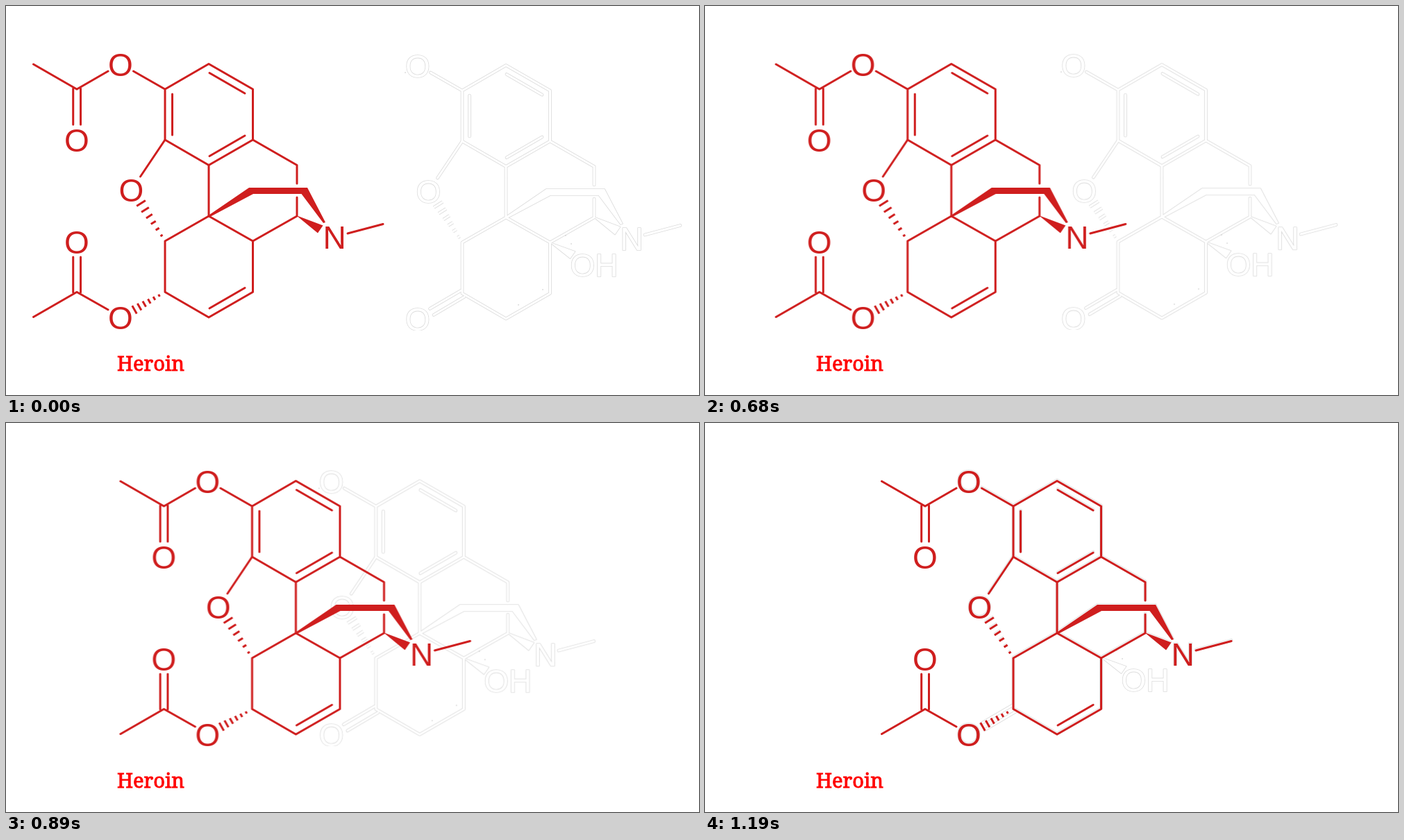
An HTML page for the animation above (7190 ms loop, 998 by 561 pixels).

```html
<!DOCTYPE html>
<html lang="en">
<head>
<meta charset="utf-8">
<title>Heroin</title>
<style>
html, body { margin: 0; width: 100%; height: 100%; overflow: hidden; background: #fff; }
svg { display: block; width: 998px; height: 561px; }
.bond { fill: none; stroke: currentColor; stroke-width: 3; stroke-linejoin: round; stroke-linecap: round; }
.hash { fill: none; stroke: currentColor; stroke-width: 3; }
.wedge { fill: currentColor; }
.atom { fill: currentColor; font: 46px "Liberation Sans", Arial, sans-serif; }
.red { color: #cf1e1e; }
.edge { color: #dcdcdc; }
.edge .bond, .edge .hash { stroke-width: 4.7; }
.edge .wedge, .edge .atom { stroke: currentColor; stroke-width: 1.7; stroke-linejoin: round; }
.core { color: #fff; }
.specks { fill: #c4c4c4; }
.name { fill: #f00; stroke: #f00; stroke-width: .9; font: 29px "Noto Serif", serif; }
</style>
</head>
<body>
<svg viewBox="0 0 998 561">
  <clipPath id="crop"><rect x="140" y="67" width="410" height="399"/></clipPath>
  <g id="right"></g>
  <g id="left"></g>
  <text class="name" x="160" y="526">Heroin</text>
</svg>
<script>
const bond = d => `<path class="bond" d="${d}"/>`;
const wedge = points => `<polygon class="wedge" points="${points}"/>`;
const atom = (s, x, y) =>
  `<text class="atom" text-anchor="middle" x="${x}" y="${y + 16.5}">${s}</text>`;

// Row of cross strokes that narrows from (x1, y1) to (x2, y2)
function hash(x1, y1, x2, y2, wide, n = 6) {
  const len = Math.hypot(x2 - x1, y2 - y1);
  const nx = (y1 - y2) / len, ny = (x2 - x1) / len;
  let d = '';
  for (let i = 0; i < n; i++) {
    const f = i / (n - 1), h = wide + (1.8 - wide) * f;
    const x = x1 + (x2 - x1) * f, y = y1 + (y2 - y1) * f;
    d += `M${x - nx * h} ${y - ny * h}L${x + nx * h} ${y + ny * h}`;
  }
  return `<path class="hash" d="${d}"/>`;
}

const shared =
  bond('M183.5 94L229 120L292 83.5L355.5 120V193L292 229.5L229 193V120') +
  bond('M239.5 127V186M293 96.5L344 126M344 187L293 216.5') +
  bond('M355.5 193L419 229.5V256M419 276V303L355.5 339') +
  bond('M229 193L193.5 246M292 229.5V303') +
  bond('M292 303L229 339V412.5L292 449L355.5 412.5V339Z') +
  bond('M492 328L543 314.5') +
  hash(194.5, 284.5, 224, 331, 7.5) +
  wedge('291.5,302 350,262 434,262 460,312 457,313 425.5,271 356,271 293,304.5') +
  wedge('418,302 456.5,316.5 449,327.5') +
  atom('O', 165, 84) + atom('O', 180.5, 265) + atom('N', 473, 333);

const acetyls =
  bond('M39.5 84L102 120L147 94M96.7 119V171M107.5 119V171') +
  bond('M39.5 448.5L102 412.5L147 438M96.7 413V362M107.5 413V362') +
  bond('M293 436L344 406.5') +
  hash(185, 438, 220.5, 417.5, 6.5) +
  atom('O', 102, 193) + atom('O', 102, 340) + atom('O', 165, 449);

const ketone =
  bond('M182.5 434.5L227 408.5M188 443.5L232 417.5') +
  wedge('355.5,339 391.5,352 384.5,362') +
  atom('O', 165, 449) + atom('OH', 419, 371);

const specks = [[147, 94], [345, 407], [310, 429], [378, 329], [386, 341]]
  .map(([x, y]) => `<circle cx="${x}" cy="${y}" r=".8"/>`).join('');

const left = document.getElementById('left');
const right = document.getElementById('right');
left.innerHTML = `<g class="red">${shared + acetyls}</g>`;
right.innerHTML = `<g clip-path="url(#crop)">
  <g class="edge">${shared + ketone}</g>
  <g class="core">${shared + ketone}</g>
  <g class="specks">${specks}</g></g>`;

const LOOP = 7190, START = 499, STEP = 30, STEPS = 24;

function slide(el, from, to) {
  const at = ([x, y]) => `translate(${x}px, ${y}px)`;
  const anim = el.animate([
    { offset: 0, transform: at(from) },
    { offset: START / LOOP, transform: at(from), easing: `steps(${STEPS}, start)` },
    { offset: (START + STEP * STEPS) / LOOP, transform: at(to) },
    { offset: 1, transform: at(to) }
  ], { duration: LOOP, iterations: Infinity });
  anim.startTime = 0;
}
slide(left, [0, 0], [215, 0]);
slide(right, [428, 2], [215, -1]);
</script>
</body>
</html>
```
